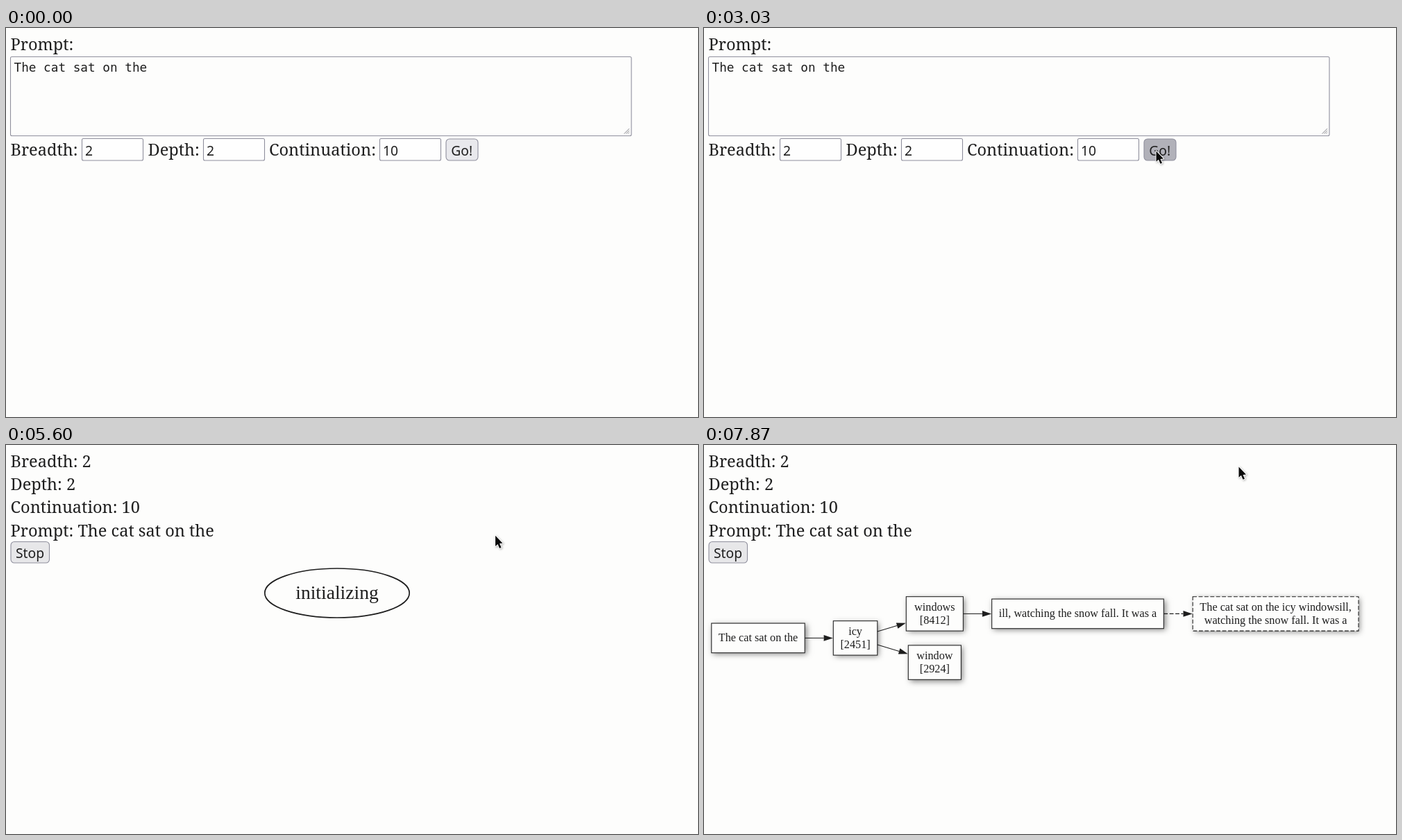
These frames come from a looping animation (997 by 561 pixels, 8 s). An HTML page with a canvas:

```html
<!DOCTYPE html>
<html lang="en">
<head>
<meta charset="utf-8">
<title>Token tree</title>
<style>
  html, body { margin: 0; width: 100%; height: 100%; overflow: hidden; background: #fdfdfc; }
  canvas { display: block; }
</style>
</head>
<body>
<canvas id="stage" width="997" height="561"></canvas>
<script>
const canvas = document.getElementById('stage');
const ctx = canvas.getContext('2d');
const LOOP = 8000;
const PAPER = '#fdfdfc';
const INK = '#1e1e1e';
const BORDER = '#8f8f9d';
const SERIF = '23.57px "Noto Serif", serif';
const SANS = '19.3px "Noto Sans", sans-serif';
const MONO = '17.7px "DejaVu Sans Mono", monospace';
const PROMPT = 'The cat sat on the';

const PRESS = 2970, SUBMIT = 3200, INIT = 4630;
const FIRST_TOKEN = 5630, SECOND_TOKEN = 5730;
const CONTINUED = 7330, BRANCHED = 7600;

// time, x, y of the pointer tip
const pointerPath = [
  [1730, 744, 533], [1770, 732, 410], [1800, 724, 319], [2100, 724, 319],
  [2200, 715, 291], [2330, 694, 228], [2470, 677, 185], [2720, 651, 177],
  [5470, 651, 177], [5600, 704, 131], [5670, 744, 72], [5730, 770, 31]
];

function pointerAt(t) {
  if (t < pointerPath[0][0]) return null;
  const next = pointerPath.findIndex(p => p[0] > t);
  if (next < 0) return pointerPath[pointerPath.length - 1].slice(1);
  const [t0, x0, y0] = pointerPath[next - 1];
  const [t1, x1, y1] = pointerPath[next];
  const u = (t - t0) / (t1 - t0);
  return [x0 + (x1 - x0) * u, y0 + (y1 - y0) * u];
}

function text(str, x, y, font = SERIF, align = 'left') {
  ctx.font = font;
  ctx.textAlign = align;
  ctx.fillStyle = INK;
  ctx.fillText(str, x, y);
}

function box(x, y, w, h, radius, fill) {
  ctx.beginPath();
  ctx.roundRect(x, y, w, h, radius);
  ctx.fillStyle = fill;
  ctx.fill();
  ctx.strokeStyle = BORDER;
  ctx.lineWidth = 1.1;
  ctx.stroke();
}

function button(label, x, y, w, h, fill) {
  box(x, y, w, h, 5, fill);
  text(label, x + w / 2 - 0.3, y + 23.5, SANS, 'center');
}

function field(label, x, inputX, value) {
  text(label, x, 184);
  box(inputX, 159.5, 88, 31.5, 2, '#fefefe');
  text(value, inputX + 4.5, 184, SANS);
}

function drawForm(t, pointer) {
  text('Prompt:', 6.6, 32);
  box(6.5, 41.5, 894.5, 114, 2, PAPER);
  text(PROMPT, 11.5, 63, MONO);

  ctx.strokeStyle = '#8a8a90';
  ctx.lineWidth = 1;
  ctx.beginPath();
  for (let d = 2; d <= 10; d += 2.7) {
    ctx.moveTo(898 - d, 152.5);
    ctx.lineTo(898, 152.5 - d);
  }
  ctx.stroke();

  field('Breadth:', 6.6, 109.5, '2');
  field('Depth:', 204.5, 284.5, '2');
  field('Continuation:', 379, 538.5, '10');

  const hover = pointer && pointer[0] > 634 && pointer[0] < 680 &&
    pointer[1] > 160 && pointer[1] < 191;
  const fill = t >= PRESS ? '#b1b1b9' : hover ? '#d0d0d9' : '#e9e9ed';
  button('Go!', 634, 160, 46, 31, fill);
}

function drawSummary() {
  ['Breadth: 2', 'Depth: 2', 'Continuation: 10', 'Prompt: ' + PROMPT]
    .forEach((line, i) => text(line, 6.6, 32 + i * 33.2));
  button('Stop', 7, 139.5, 55.5, 30.5, '#e7e7e9');
}

function graphText(lines, cx, cy, k) {
  const size = 27.6 * k;
  const font = `${size}px "Liberation Serif", serif`;
  lines.forEach((line, i) => {
    const row = i - (lines.length - 1) / 2;
    text(line, cx, cy + size * (0.3 + 1.2 * row), font, 'center');
  });
}

function node(left, right, cy, lines, k, dashed = false) {
  const h = (lines.length > 1 ? 84 : 72.5) * k;
  const y = cy - h / 2;
  ctx.save();
  ctx.shadowColor = 'rgba(0,0,0,0.5)';
  ctx.shadowBlur = 14 * k;
  ctx.shadowOffsetX = ctx.shadowOffsetY = 4 * k;
  ctx.fillStyle = PAPER;
  ctx.fillRect(left, y, right - left, h);
  ctx.restore();

  ctx.save();
  ctx.strokeStyle = INK;
  ctx.lineWidth = 1.8 * k;
  if (dashed) ctx.setLineDash([5.8, 2.6]);
  ctx.strokeRect(left, y, right - left, h);
  ctx.restore();
  graphText(lines, (left + right) / 2, cy, k);
}

function arrow(x1, y1, x2, y2, k, dashed = false) {
  const len = 22.5 * k;
  ctx.save();
  ctx.translate(x2, y2);
  ctx.rotate(Math.atan2(y2 - y1, x2 - x1));
  ctx.strokeStyle = ctx.fillStyle = INK;
  ctx.lineWidth = 1.8 * k;
  if (dashed) ctx.setLineDash([5.8, 2.6]);
  ctx.beginPath();
  ctx.moveTo(-Math.hypot(x2 - x1, y2 - y1), 0);
  ctx.lineTo(-len, 0);
  ctx.stroke();
  ctx.beginPath();
  ctx.moveTo(0, 0);
  ctx.lineTo(-len, -7.4 * k);
  ctx.lineTo(-len, 7.4 * k);
  ctx.fill();
  ctx.restore();
}

function drawInitializing() {
  ctx.beginPath();
  ctx.ellipse(477, 213.5, 104.2, 35.5, 0, 0, Math.PI * 2);
  ctx.strokeStyle = INK;
  ctx.lineWidth = 1.7;
  ctx.stroke();
  graphText(['initializing'], 477, 213.7, 1);
}

function drawTokens(count) {
  const y = 219.8;
  const dx = count === 1 ? 105 : 0;
  node(169 + dx, 397.5 + dx, y, [PROMPT], 1);
  node(467.5 + dx, 576 + dx, y, ['icy', '[2451]'], 1);
  arrow(397.5 + dx, y, 466.5 + dx, y, 1);
  if (count > 1) {
    node(646, 786, y, ['windows', '[8412]'], 1);
    arrow(576, y, 645, y, 1);
  }
}

function drawTree(branched) {
  const k = 0.588;
  const root = branched ? 278.4 : 219.8;
  const upper = branched ? 243.4 : root;
  const lower = 313.6;
  node(10.8, 145.2, root, [PROMPT], k);
  node(186.3, 249.8, root, ['icy', '[2451]'], k);
  node(291.3, 373.4, upper, ['windows', '[8412]'], k);
  node(414.7, 662.3, upper, ['ill, watching the snow fall. It was a'], k);
  node(704.2, 943, upper,
    ['The cat sat on the icy windowsill,', 'watching the snow fall. It was a'], k, true);
  arrow(145.2, root, 185.8, root, k);
  arrow(373.4, upper, 414.2, upper, k);
  arrow(662.3, upper, 703.7, upper, k, true);
  if (branched) {
    node(294.3, 370.4, lower, ['window', '[2924]'], k);
    arrow(249.8, 269, 290.8, 256.8, k);
    arrow(249.8, 288, 293.8, 301.2, k);
  } else {
    arrow(249.8, root, 290.8, root, k);
  }
}

function drawPointer([x, y]) {
  ctx.save();
  ctx.translate(x, y);
  ctx.beginPath();
  [[0.5, 0.5], [0.5, 15.8], [3.9, 12.8], [6.5, 18.8], [9, 17.7], [6.5, 11.9], [11, 11.5]]
    .forEach(([px, py]) => ctx.lineTo(px, py));
  ctx.closePath();
  ctx.shadowColor = 'rgba(0,0,0,0.3)';
  ctx.shadowBlur = 3;
  ctx.shadowOffsetX = ctx.shadowOffsetY = 1;
  ctx.strokeStyle = '#fff';
  ctx.lineWidth = 2;
  ctx.lineJoin = 'round';
  ctx.stroke();
  ctx.shadowColor = 'transparent';
  ctx.fillStyle = '#0a0a0a';
  ctx.fill();
  ctx.restore();
}

function draw(t) {
  const pointer = pointerAt(t);
  ctx.fillStyle = PAPER;
  ctx.fillRect(0, 0, canvas.width, canvas.height);

  if (t < SUBMIT) drawForm(t, pointer);
  else drawSummary();

  if (t >= CONTINUED) drawTree(t >= BRANCHED);
  else if (t >= FIRST_TOKEN) drawTokens(t >= SECOND_TOKEN ? 2 : 1);
  else if (t >= INIT) drawInitializing();

  if (pointer) drawPointer(pointer);
}

const start = performance.now();
function tick() {
  draw((performance.now() - start) % LOOP);
  requestAnimationFrame(tick);
}
tick();
</script>
</body>
</html>
```
